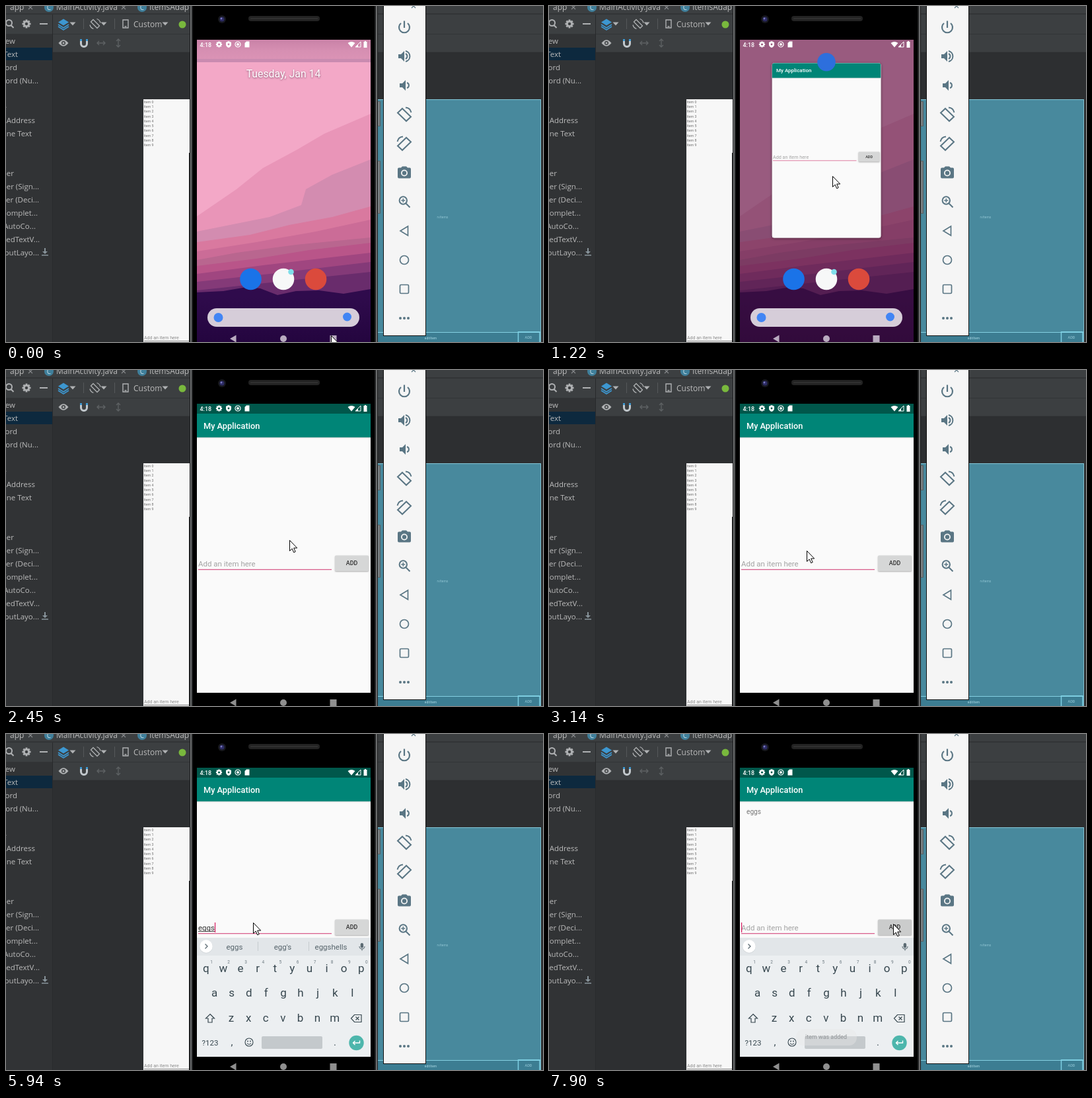
Write an HTML page with a canvas that moves like this. It is 813 by 508 pixels and loops after 8 s.

```html
<!DOCTYPE html>
<html lang="en">
<head>
<meta charset="utf-8">
<title>Phone emulator</title>
<style>
html, body { margin: 0; width: 100%; height: 100%; overflow: hidden; background: #2d2f31; }
canvas { display: block; }
</style>
</head>
<body>
<canvas id="stage" width="813" height="508"></canvas>
<script>
const c = document.getElementById('stage').getContext('2d');
const LOOP = 8000;
const UI = '"Open Sans", "Noto Sans", sans-serif';
const RB = 'Roboto, sans-serif';

// ---- helpers ----
const rect = (x, y, w, h, col) => { c.fillStyle = col; c.fillRect(x, y, w, h); };
const round = (x, y, w, h, r, col) => {
  c.fillStyle = col; c.beginPath(); c.roundRect(x, y, w, h, r); c.fill();
};
const disc = (x, y, r, col) => {
  c.fillStyle = col; c.beginPath(); c.arc(x, y, r, 0, 7); c.fill();
};
const text = (s, x, y, size, col, align = 'left', font = RB, weight = 400) => {
  c.font = `${weight} ${size}px ${font}`;
  c.fillStyle = col; c.textAlign = align; c.fillText(s, x, y);
};
const paint = (x, y, d, fill, line, w = 1) => {
  const p = new Path2D(d);
  c.save(); c.translate(x, y);
  if (fill) { c.fillStyle = fill; c.fill(p); }
  if (line) { c.strokeStyle = line; c.lineWidth = w; c.stroke(p); }
  c.restore();
};
const fade = (a, draw) => {
  if (a <= 0) return;
  c.save(); c.globalAlpha = a; draw(); c.restore();
};
const gear = (x, y, r, col, hole) => {
  c.save(); c.translate(x, y);
  for (let i = 0; i < 8; i++) { rect(-r * .22, -r, r * .44, r, col); c.rotate(Math.PI / 4); }
  disc(0, 0, r * .76, col); disc(0, 0, r * .34, hole);
  c.restore();
};
// value of the last step that has begun
const at = (steps, t) => {
  let v = steps[0];
  for (const s of steps) if (s[0] <= t) v = s;
  return v.slice(1);
};

// ---- timeline: [start ms, values...] ----
const MOUSE = [[0, 492, 498], [820, 501, 420], [940, 507, 309], [1090, 460, 280], [1220, 429, 257],
  [3140, 390, 273], [3290, 374, 285], [6800, 417, 287], [6950, 507, 300], [7100, 518, 291],
  [7230, 521, 288], [7380, 521, 287]];
// card: opacity, left, top, scale, wallpaper dim
const CARD = [[0, 0, 337, 85, .63, 0], [120, .5, 334, 82, .654, .1], [240, .96, 336.5, 85, .635, .22],
  [360, 1, 337.4, 85.7, .629, .42], [510, 1, 337.7, 86.2, .6265, .5], [2210, 1, 336.7, 85.4, .633, .5],
  [2330, 1, 334.4, 84.4, .652, .5]];
// opacity of the entry row in the middle and at the bottom
const ROW = [[0, 1, 0], [2600, .6, .4], [2750, .2, .8], [2880, 0, 1], [3000, 1, 0]];
// typed text, composing, caret shown
const TYPED = [[0, '', 0, 0], [3290, '', 0, 1], [3870, '', 0, 0], [4430, '', 0, 1], [4830, 'e', 1, 1],
  [5350, 'e', 1, 0], [5660, 'eg', 1, 1], [5810, 'egg', 1, 1], [5940, 'eggs', 1, 1],
  [6210, 'eggs ', 0, 1], [6640, 'eggs ', 0, 0], [7100, 'eggs ', 0, 1], [7780, '', 0, 1]];
const HINTS = [[0], [4950, 'e', 'eat', 'every'], [5810, 'egg', 'eggs', "egg's"],
  [5940, 'eggs', "egg's", 'eggshells'], [6210]];

// ---- editor behind the phone ----
function drop(x, y) { paint(x, y, 'M-4.5-2.5h9L0 2.5z', '#afb1b3'); }

function classIcon(x, y) {
  disc(x, y, 7, '#3f7f9b');
  text('C', x, y + 4, 10, '#cfe3ea', 'center', UI);
}

function editor() {
  const dim = '#5d6163', ink = '#afb1b3';
  rect(0, 0, 813, 508, '#2d2f31');
  rect(0, 0, 813, 70, '#3c3f41');
  rect(0, 11, 813, 2, '#323436');
  rect(0, 42, 813, 1, '#323436');
  rect(71, 69, 742, 1, '#37393b');
  text('app', 6, 6, 12, '#bbbbbb', 'left', UI);
  classIcon(65, 2); classIcon(206, 2);
  text('MainActivity.java', 76, 6, 12, '#bbbbbb', 'left', UI);
  text('ItemsAdapter.java', 217, 6, 12, '#bbbbbb', 'left', UI);
  for (const x of [37, 178]) paint(x, 2, 'M-3-3L3 3M3-3L-3 3', null, '#85888a', 1.2);

  // palette
  rect(0, 43, 70, 465, '#313335');
  rect(0, 63, 70, 19, '#0d293e');
  rect(70, 13, 1, 495, '#282a2c');
  const rows = [[57, 'TextView', 14], [77, 'Plain Text', 18], [97, 'Password', 17],
    [117, 'Password (Nu...', 49], [157, 'Phone', 1], [177, 'Postal Address', 44],
    [197, 'Multiline Text', 39], [257, 'Number', 12], [277, 'Number (Sign...', 50],
    [297, 'Number (Deci...', 50], [317, 'AutoComplet...', 48], [337, 'MultiAutoCo...', 45],
    [357, 'CheckedTextV...', 51], [377, 'TextInputLayo...', 50]];
  for (const [y, s, x] of rows) text(s, x, y, 11.5, '#bbbbbb', 'right', UI);
  text('E-mail', 1, 137, 11.5, '#c0703a', 'right', UI);
  paint(59, 371, 'M-1-5h2v5h3L0 4-4 0h3zM-5 5h10v1.5h-10z', '#87939a');

  // upper tool row
  paint(5, 27, 'M4-1.5A4.5 4.5 0 1 1-5-1.5A4.5 4.5 0 1 1 4-1.5M2.5 2L6.5 6', null, ink, 2);
  gear(31, 27, 6.5, ink, '#3c3f41');
  rect(51, 26, 12, 2, ink);
  paint(87, 27, 'M0-7.5L8-2.5 0 2.5-8-2.5z', '#3d97d0');
  paint(87, 27, 'M-8 1L0 6 8 1M-8 4L0 9 8 4', null, '#3d97d0', 1.5);
  drop(101, 27); rect(117, 19, 1, 16, '#55585a');
  paint(135, 27, 'M-3-6.5L6.5 3 3 6.5-6.5-3zM-8 1.5Q-7 6-2.5 7.5M2.5-7.5Q7-6 8-1.5', null, ink, 1.3);
  drop(148, 27); rect(164, 19, 1, 16, '#55585a');
  paint(181, 27, 'M-4-6h8v12h-8zM-1.5 4h3', null, ink, 1.4);
  text('Custom', 193, 32, 12, '#bbbbbb', 'left', UI);
  drop(241, 27);
  disc(267, 28, 5.5, '#79b83d');

  // lower tool row
  paint(87, 56, 'M-7.5 0Q0-9.5 7.5 0Q0 9.5-7.5 0', ink);
  disc(87, 56, 3, '#3c3f41'); disc(87, 56, 1.6, ink);
  paint(118, 56, 'M-4.5-3V1A4.5 4.5 0 0 0 4.5 1V-3', null, '#c2c8cc', 3);
  rect(112, 50, 3, 3, '#3d97d0'); rect(121, 50, 3, 3, '#3d97d0');
  paint(144, 56, 'M-6 0H6M-3-3L-6 0-3 3M3-3L6 0 3 3', null, dim, 1.4);
  paint(170, 56, 'M0-6V6M-3-3L0-6 3-3M-3 3L0 6 3 3', null, dim, 1.4);

  // design preview
  rect(208, 141, 70, 367, '#f7f7f7');
  for (let i = 0; i < 10; i++) text('Item ' + i, 208.5, 147 + i * 7.22, 5.3, '#707070');
  text('Add an item here', 209, 504, 7, '#8d8d8d');
  rect(209, 506, 69, 1, '#8a8a8a');

  // blueprint preview
  rect(563, 141, 247, 367, '#48899d');
  rect(563, 141, 247, 1, '#83c5d6'); rect(809, 141, 1, 367, '#83c5d6');
  rect(563, 493, 246, 15, '#3c7d92');
  rect(563, 493, 246, 1, '#83d0e2');
  text('rvItems', 661, 320.5, 5, '#8fc4d2', 'center');
  text('editItem', 643, 504, 5, '#a9d8e4', 'center');
  c.strokeStyle = '#7ed0e3'; c.lineWidth = 1.5; c.strokeRect(775.5, 492.8, 32.5, 17);
  text('ADD', 791, 503, 5.5, '#9fd3e0', 'center');
}

function sidePanel() {
  const k = '#5a7684', x = 603;
  rect(571, 0, 65, 499, '#111');
  rect(572, 0, 63, 498, '#f5f5f5');
  paint(617, 0, 'M-3-3L3 3M3-3L-3 3', null, k, 1.2);
  paint(x, 32, 'M-5-6A8 8 0 1 0 5-6M0-9.5V1', null, k, 2.2);
  paint(x, 76, 'M-9-3h4l5-5v16l-5-5h-4z', k);
  paint(x, 76, 'M2-4A4.5 4.5 0 0 1 2 4M2-8A8.2 8.2 0 0 1 2 8', null, k, 2);
  paint(x, 120, 'M-7-3h4l5-5v16l-5-5h-4z', k);
  paint(x, 120, 'M4-4A4.2 4.2 0 0 1 4 4', null, k, 2);
  for (const [y, m] of [[164, 1], [208, -1]]) {
    c.save(); c.translate(x, y); c.scale(m, 1);
    paint(0, 0, 'M-3-9L10 3.5 3 10-10-2.5z', null, k, 2);
    paint(0, 0, 'M2-10.5Q9-10 10.5-3', null, k, 1.8);
    c.restore();
  }
  paint(x, 252, 'M-3-9.5h6l2 2h3q2 0 2 2v12q0 2-2 2H-8q-2 0-2-2v-12q0-2 2-2h3z', k);
  disc(x, 252.5, 5, '#f5f5f5'); disc(x, 252.5, 3.2, k);
  paint(x, 296, 'M4-2A5.7 5.7 0 1 1-7.4-2A5.7 5.7 0 1 1 4-2M2.5 2.5L8.5 8.5', null, k, 2);
  paint(x, 296, 'M-4.7-2h6M-1.7-5v6', null, k, 1.4);
  paint(x, 340, 'M5.5-7V7L-6 0z', null, k, 1.7);
  paint(x, 384, 'M6.5 0A6.5 6.5 0 1 1-6.5 0A6.5 6.5 0 1 1 6.5 0', null, k, 1.7);
  c.strokeStyle = k; c.lineWidth = 1.7;
  c.beginPath(); c.roundRect(596.5, 421.5, 13, 13, 1.5); c.stroke();
  for (const d of [-6, 0, 6]) disc(x + d, 472, 2, k);
}

function phoneBody() {
  rect(563, 144, 4, 38, '#5c6265'); rect(563, 234, 4, 80, '#5c6265');
  rect(564, 145, 1, 36, '#a2a8aa'); rect(564, 235, 1, 78, '#a2a8aa');
  rect(277, 222, 4, 286, '#1c1d1e');
  round(278, -30, 285, 600, 20, '#1c1d1e');
  round(279, -29, 283, 600, 19, '#6c6e6f');
  round(281, -27, 279, 600, 17, '#222324');
  round(283, -26, 275, 600, 16, '#000');
  round(367, 15, 108, 8, 4, '#232323');
  rect(370, 18, 102, 2, '#303030');
  disc(327, 20, 6, '#17181d'); disc(327, 20, 3.6, '#2c2b63'); disc(326, 19, 1.4, '#7a7ac0');
}

// ---- phone screen ----
function wallpaper(shade) {
  rect(289, 51, 263, 457, '#f3a8c7');
  fade(shade, () => {
    const g = c.createLinearGradient(0, 51, 0, 84);
    g.addColorStop(0, '#c982a7'); g.addColorStop(.5, '#d68fb2'); g.addColorStop(1, '#dc94b6');
    rect(289, 51, 263, 34, g);
    rect(289, 80, 263, 5, '#c98bb0');
  });
  const bands = [
    ['#e995b8', 'M0 267L60 226 100 194 152 166 193 142 263 112'],
    ['#d38cb0', 'M0 290L110 268 158 250 165 226 205 204 263 181'],
    ['#d9799f', 'M0 306L80 295 140 280 205 268 263 252'],
    ['#cb6c97', 'M0 320L90 306 180 290 263 272'],
    ['#b9668f', 'M0 333L60 322 150 310 263 299'],
    ['#b95589', 'M0 342L90 331 170 318 263 307'],
    ['#a04680', 'M0 354L100 341 263 322'],
    ['#843a78', 'M0 366L110 354 263 336'],
    ['#692c6c', 'M0 379L140 364 263 351'],
    ['#2f0b4c', 'M0 382L40 380 75 374 96 376 122 386 150 380 185 379 222 384 263 377']
  ];
  for (const [col, d] of bands) paint(289, 51, d + 'V457H0z', col);
  const low = c.createLinearGradient(0, 440, 0, 508);
  low.addColorStop(0, '#24053f00'); low.addColorStop(1, '#24053f');
  rect(289, 440, 263, 68, low);
}

function dock() {
  disc(370.5, 413, 16.3, '#1a73e8');
  disc(420, 413, 16.3, '#f7f8f8');
  disc(431.5, 402, 4.3, '#80deea');
  disc(469, 413, 16.3, '#db4a3c');
  round(305, 457, 230, 28, 14, '#d6cdd9');
  disc(321.5, 471, 7, '#4285f4');
  disc(516.5, 470, 6.5, '#4285f4');
}

function navBar(col) {
  paint(344, 503, 'M4.5-5.5V5.5L-5 0z', col);
  disc(420, 503, 5, col);
  rect(490.5, 498, 10, 10, col);
}

function statusBar(bg) {
  const w = '#fff';
  text('4:18', 293.5, 61.5, 8.9, w, 'left', RB, 500);
  gear(322.5, 58, 4.6, w, bg);
  paint(337, 58, 'M0-5L4-3V0Q4 3.5 0 5Q-4 3.5-4 0V-3z', w); disc(337, 58, 1.4, bg);
  paint(351, 58, 'M4 0A4 4 0 1 1-4 0A4 4 0 1 1 4 0', null, w, 1.2); disc(351, 58, 2, w);
  paint(365, 58, 'M-1-4.5H3.5V4.5H-3.5V-2z', w);
  paint(523, 58, 'M0 4.5L-5.5-2Q0-6 5.5-2z', w);
  paint(533, 58, 'M4-4V4H-4z', null, w, 1); paint(533, 58, 'M0 0V4H-4z', w);
  rect(541.5, 54, 5, 9, w); rect(543, 53, 2, 1, w);
}

function entryRow(dy, s) {
  if (s.typed) {
    text(s.typed, 291, 297 + dy, 11.5, '#333');
  } else {
    text('Add an item here', 291, 297 + dy, 11.5, '#a3a3a3');
  }
  const w = c.measureText(s.typed).width;
  if (s.composing) rect(291, 298 + dy, w, 1, '#444');
  if (s.caret) rect(291 + w, 285 + dy, 1.2, 15, '#d81b60');
  rect(291, 301 + dy, 202, 1.3, '#d9628f');
  c.save();
  c.shadowColor = 'rgba(0,0,0,.3)'; c.shadowBlur = 2; c.shadowOffsetY = 1;
  round(498, 280.5 + dy, 51, 23.5, 1.5, s.pressed ? '#cbcccc' : '#d6d7d7');
  c.restore();
  text('ADD', 523.5, 295.3 + dy, 8.9, '#2d2d2d', 'center', RB, 500);
}

function app(s) {
  rect(289, 66, 263, 422, '#fafafa');
  const g = c.createLinearGradient(0, 101, 0, 104);
  g.addColorStop(0, '#c2c5c5'); g.addColorStop(1, '#fafafa');
  rect(289, 101, 263, 3, g);
  rect(289, 66, 263, 35.8, '#008577');
  text('My Application', 299, 88.8, 12.8, '#fff', 'left', RB, 500);
  if (s.added) text('eggs', 299, 121, 10.2, '#777');
  fade(s.mid, () => entryRow(0, s));
  fade(s.low, () => entryRow(180, s));
}

function keyboard(hints) {
  const k = '#37474f', soft = '#5b6a72';
  rect(289, 308, 263, 180, '#eceff1');
  rect(289, 308, 263, 27, '#e2e6e9');
  disc(303, 321.8, 10, '#d4d9dc'); disc(303, 321, 9.7, '#fff');
  paint(303, 321, 'M-1.5-3.5L2 0-1.5 3.5', null, soft, 1.3);
  round(536.7, 316, 4.4, 7.5, 2.2, soft);
  paint(539, 321, 'M-4 0A4 4 0 0 0 4 0M0 4V6.5', null, soft, 1.1);
  hints.forEach((s, i) => text(s, 346 + i * 73, 325.5, 11.5, '#56646b', 'center'));
  if (hints.length) for (const x of [381, 458]) rect(x, 314, 1, 14, '#c6cccf');

  const row = (keys, x, y) => [...keys].forEach((s, i) => text(s, x + i * 26.1, y, 17, k, 'center'));
  row('qwertyuiop', 302.8, 359.5);
  row('asdfghjkl', 315.5, 397);
  row('zxcvbnm', 341, 435);
  [...'1234567890'].forEach((s, i) => text(s, 311 + i * 26.1, 347, 6.5, '#6d7a81', 'center'));
  paint(309, 430, 'M0-6.5L6.5 0H3V6H-3V0H-6.5z', null, k, 1.2);
  paint(530.5, 430, 'M-8 0L-3-5.5H7.5V5.5H-3zM-1-2.5L4 2.5M4-2.5L-1 2.5', null, k, 1.2);
  text('?123', 309, 470.5, 11.5, k, 'center');
  text(',', 342, 471, 15, k, 'center');
  text('.', 498, 471, 15, k, 'center');
  paint(368, 466, 'M6 0A6 6 0 1 1-6 0A6 6 0 1 1 6 0M-3 1.5Q0 5 3 1.5', null, k, 1.1);
  disc(366, 464.5, .9, k); disc(370, 464.5, .9, k);
  round(387, 457, 92, 19, 2, '#c4c9cc');
  disc(530.5, 467, 11.2, '#4db6ac');
  paint(530.5, 467, 'M5-3.5V0H-5M-2-3L-5 0-2 3', null, '#fff', 1.4);
}

function toast() {
  fade(.4, () => round(374, 446, 92, 25, 12, '#e6e6e6'));
  text('item was added', 388, 460.5, 8.96, '#8d9194');
}

function mouse(x, y) {
  paint(x + .5, y + .5, 'M0 0V16L3.7 12.6 6.2 18.3 8.7 17.2 6.2 11.6H11.2z', '#fff', '#000', 1);
}

function home(t, s) {
  const [alpha, x, y, k, dim] = at(CARD, t);
  wallpaper(1 - 2 * dim);
  fade(dim, () => rect(289, 51, 263, 457, '#401038'));
  if (t < 120) {
    c.save();
    c.shadowColor = 'rgba(60,20,50,.6)'; c.shadowBlur = 3; c.shadowOffsetY = 1;
    text('Tuesday, Jan 14', 420, 108, 15.8, '#fff', 'center');
    c.restore();
  }
  dock();
  navBar('#b9abc0');
  fade(alpha, () => {
    const w = 263 * k, h = 422 * k;
    c.save();
    c.shadowColor = 'rgba(0,0,0,.45)'; c.shadowBlur = 4; c.shadowOffsetY = 1;
    round(x, y, w, h, 3.5, '#fafafa');
    c.restore();
    c.save();
    c.beginPath(); c.roundRect(x, y, w, h, 3.5); c.clip();
    c.translate(x, y); c.scale(k, k); c.translate(-289, -66);
    app(s);
    c.restore();
    disc(420, 84.8, 13.8, '#2d6fdd');
  });
  statusBar(dim > .3 ? '#98597b' : '#c982a7');
}

function draw(t) {
  const [typed, composing, caret] = at(TYPED, t);
  const [mid, low] = at(ROW, t);
  const s = { typed, composing, caret, mid, low, added: t >= 7780, pressed: t >= 7660 };
  editor();
  phoneBody();
  c.save();
  c.beginPath(); c.rect(289, 51, 263, 457); c.clip();
  if (t < 2450) {
    home(t, s);
  } else {
    app(s);
    rect(289, 51, 263, 15, '#00574b');
    statusBar('#00574b');
    if (t >= 3290) keyboard(at(HINTS, t));
    if (t >= 7900) toast();
    rect(289, 488, 263, 20, '#000');
    navBar('#8f8f8f');
  }
  c.restore();
  sidePanel();
  mouse(...at(MOUSE, t));
}

const start = performance.now();
function tick() {
  draw((performance.now() - start) % LOOP);
  requestAnimationFrame(tick);
}
tick();
</script>
</body>
</html>
```
